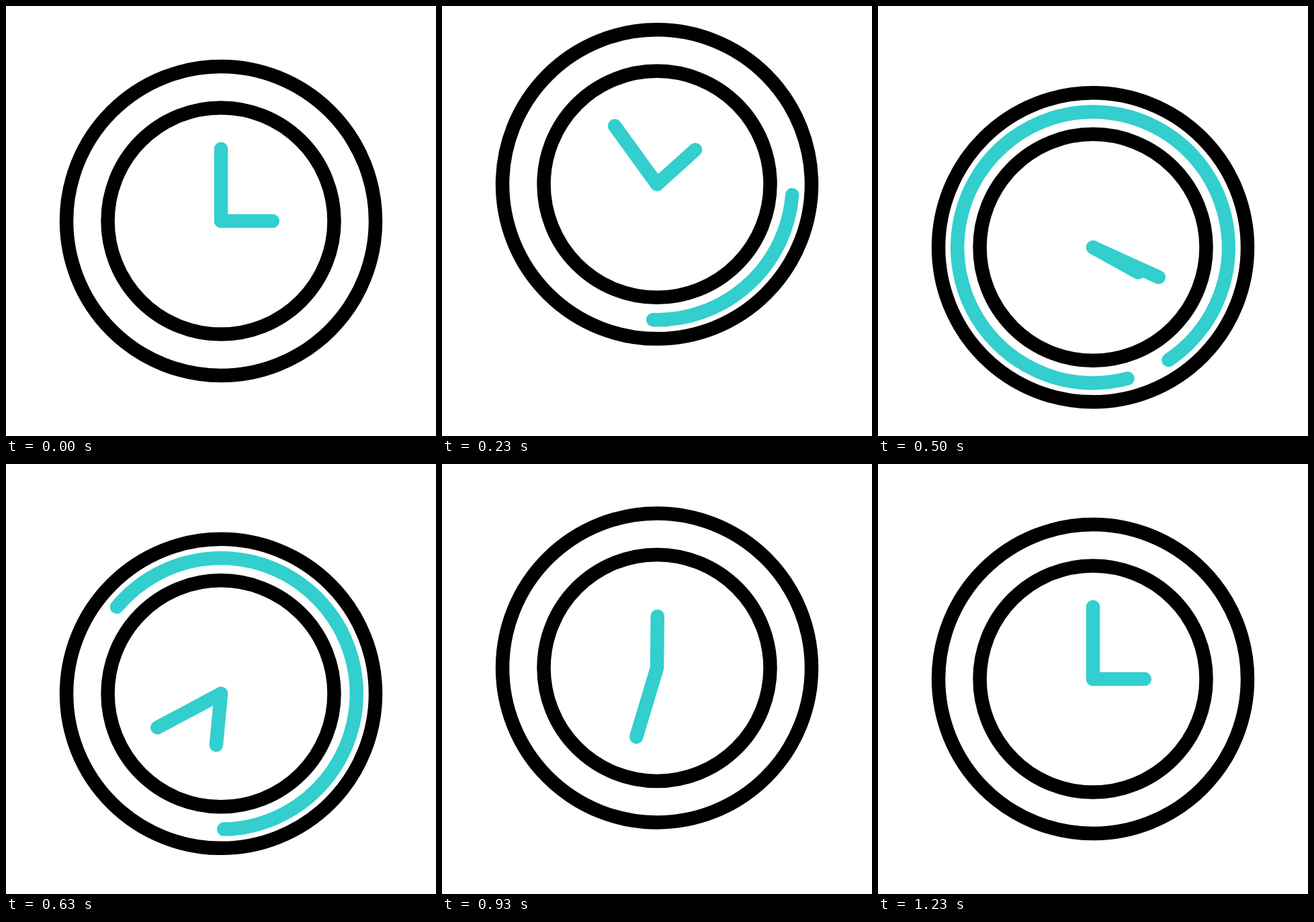
An HTML page that plays this animation: 640x640 px, repeating every 1.67 s.

```html
<!DOCTYPE html>
<html lang="en">
<head>
<meta charset="utf-8">
<title>Clock</title>
<style>
  html, body { margin: 0; width: 100%; height: 100%; overflow: hidden; background: #fff; }
  svg { display: block; width: 100%; height: 100%; }
</style>
</head>
<body>
<svg viewBox="0 0 640 640" fill="none" stroke-width="20.5" stroke-linecap="round">
  <g id="clock">
    <g stroke="#000">
      <circle r="230"/>
      <circle r="168.5"/>
    </g>
    <g stroke="#33cece">
      <circle id="arc" r="201.8" pathLength="360"/>
      <path id="minute" d="M0 0V-107.3"/>
      <path id="hour" d="M0 0H76.8"/>
    </g>
  </g>
</svg>
<script>
const LOOP = 1670, FPS = 30, LAST = 37;
const [clock, arc, minute, hour] =
  ["clock", "arc", "minute", "hour"].map(id => document.getElementById(id));

// Cubic Bezier easing with flat ends: control points (a, 0) and (b, 1)
function ease(a, b) {
  return u => {
    if (u <= 0) return 0;
    if (u >= 1) return 1;
    let lo = 0, hi = 1, s = 0.5;
    for (let i = 0; i < 24; i++) {
      s = (lo + hi) / 2;
      const x = 3 * a * s * (1 - s) ** 2 + 3 * b * s * s * (1 - s) + s ** 3;
      if (x < u) lo = s; else hi = s;
    }
    return s * s * (3 - 2 * s);
  };
}

const inOut = ease(0.42, 0.58);
const smooth = ease(1 / 3, 2 / 3);
const minuteEase = ease(0.37, 0.69);
const hourEase = ease(0.42, 0.68);
const spinEase = ease(0.28, 0.67);

const move = (n, t0, t1, from, to, fn) => from + (to - from) * fn((n - t0) / (t1 - t0));

// Each stop is [step, value]
function follow(n, stops) {
  let i = 1;
  while (i < stops.length - 1 && n > stops[i][0]) i++;
  const [t0, from] = stops[i - 1], [t1, to] = stops[i];
  return move(n, t0, t1, from, to, inOut);
}

const bounce = [[0, 320], [8, 263.6], [16, 362.4], [24, 292.2], [33, 320]];

// Short pull back, then a long swing
const swing = (n, back, turn, fn) =>
  n < 5 ? move(n, 0, 5, 0, back, inOut) : move(n, 5, LAST, back, turn, fn);

function draw(ms) {
  const n = Math.min(LAST, Math.floor((ms + 3.4) * FPS / 1000));
  clock.setAttribute("transform", `translate(320 ${follow(n, bounce)})`);
  minute.setAttribute("transform", `rotate(${swing(n, -43, 720, minuteEase)})`);
  hour.setAttribute("transform", `rotate(${swing(n, -45, 360, hourEase)})`);

  const head = move(n, 3.06, 15.36, 0, 360, smooth);
  const tail = move(n, 13, 27.7, 0, 360, smooth);
  const spin = move(n, 4.7, 28.8, 0, 135, spinEase);
  const length = head - tail;
  arc.setAttribute("visibility", length > 0.01 ? "visible" : "hidden");
  arc.setAttribute("stroke-dasharray", `${length} 720`);
  arc.setAttribute("transform", `rotate(${spin + tail})`);
}

const start = performance.now();
function tick() {
  draw((performance.now() - start) % LOOP);
  requestAnimationFrame(tick);
}
tick();
</script>
</body>
</html>
```
